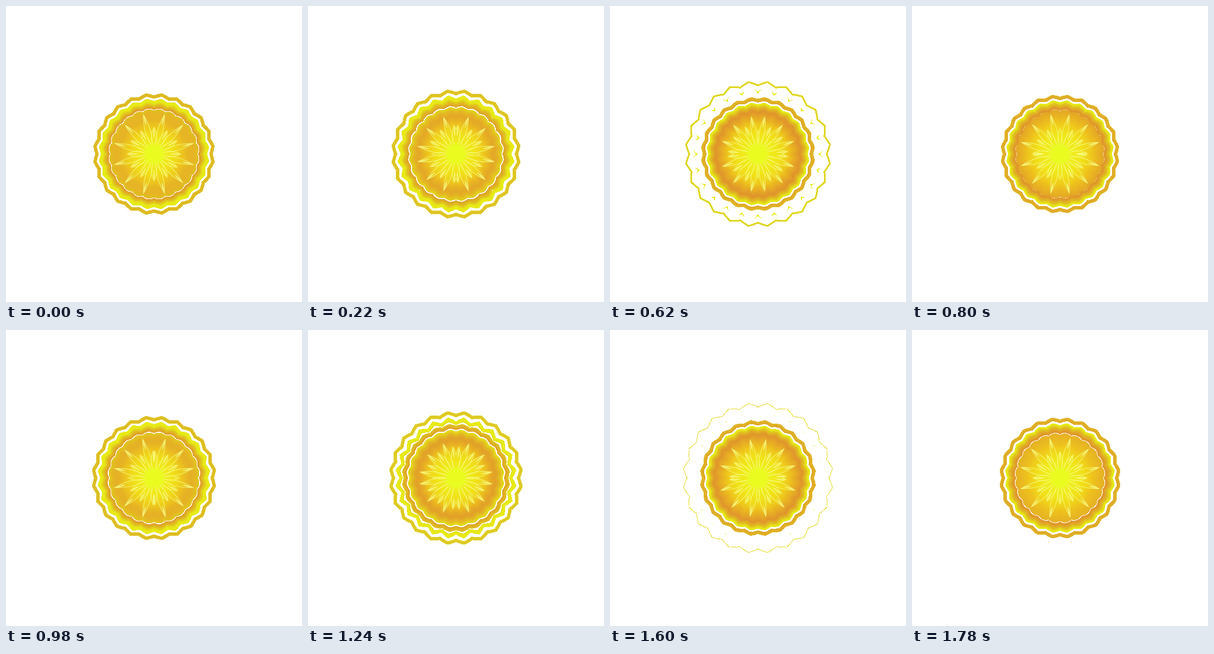
These frames come from a looping animation (512x512 px, 1800 ms). An HTML page with a canvas:

```html
<!DOCTYPE html>
<html lang="en">
<head>
<meta charset="utf-8">
<title>Blooming sun</title>
<style>
  html, body { margin: 0; width: 100%; height: 100%; overflow: hidden; background: #fff; }
  canvas { display: block; width: 100vmin; height: 100vmin; }
</style>
</head>
<body>
<canvas width="512" height="512"></canvas>
<script>
const ctx = document.querySelector('canvas').getContext('2d');
const CYCLE = 900, STEP = 20, SIZE = 272, MID = 256, LEFT = MID - SIZE / 2;
const BIRTH = -0.13, DEATH = 1.82; // life of a ring, in cycles

const WHITE = [255, 255, 255], YELLOW = [231, 234, 22], GOLD = [224, 190, 32],
      ORANGE = [224, 150, 43], AMBER = [230, 180, 36], CORE = [234, 251, 32];

const clamp = x => Math.max(0, Math.min(1, x));
const mix = (a, b, k) => a.map((v, i) => v + (b[i] - v) * k);

// Colour ramp sampled into 101 entries; stops are [position, colour].
function ramp(stops) {
  return Array.from({ length: 101 }, (_, n) => {
    const x = n / 100;
    let i = 1;
    while (i < stops.length - 1 && x > stops[i][0]) i++;
    const [x0, a] = stops[i - 1], [x1, b] = stops[i];
    return mix(a, b, clamp((x - x0) / (x1 - x0)));
  });
}
const pick = (colors, x) => colors[Math.round(clamp(x) * 100)];

// The four edges of a ring and the zigzag inside it, speeding up outward with age.
function wave(age) {
  const life = clamp((DEATH - age) / 0.25), late = Math.max(0, age - 1);
  const depth = 3 + 1.3 * age * age, zigDepth = depth + 6 * late;
  const ringOut = 89 + 8.9 * age + 8.1 * age * age;
  const ringIn = ringOut - (6.3 + 3.7 * Math.max(0, 1 - age) ** 2) * life;
  const zigOut = ringIn - (1.2 + 2.5 * age) * clamp((age - BIRTH) / 0.1);
  const zigIn = zigOut - 11 + 50 * late ** 3;
  const zigInValley = zigOut - zigDepth - 6.5 * life;
  const round = clamp(1 - age / 0.8);
  const edge = (peak, valley) => u => valley + (peak - valley) * (u + round * u * (1 - u));
  return {
    ringOut: edge(ringOut, ringOut - depth),
    ringIn: edge(ringIn, ringIn - depth),
    zigOut: edge(zigOut, zigOut - zigDepth),
    zigIn: edge(zigIn, zigInValley)
  };
}

// Polar grid: radius, and place between valley (0) and peak (1).
const radius = new Float32Array(SIZE * SIZE), fold = new Float32Array(SIZE * SIZE);
for (let i = 0; i < radius.length; i++) {
  const x = i % SIZE + 0.5 - SIZE / 2, y = Math.floor(i / SIZE) + 0.5 - SIZE / 2;
  radius[i] = Math.hypot(x, y);
  const tooth = (Math.atan2(x, -y) + 2 * Math.PI) * 12 / Math.PI;
  fold[i] = 1 - Math.abs(2 * (tooth % 1) - 1);
}
const image = ctx.createImageData(SIZE, SIZE);

function drawBands(x) {
  const old = wave(x + 1), mid = wave(x);
  const seed = 62 + 17.5 * x, seedEdge = u => seed - 4 + 4 * u;
  const young = x - 1 > BIRTH ? wave(x - 1) : { ringIn: seedEdge, zigOut: seedEdge };

  const ripe = clamp(x * 1.6);
  const heat = Math.sin(Math.PI * x ** 1.5);
  const rimColor = mix(GOLD, YELLOW, ripe);
  const disc = ramp([
    [0, CORE], [0.2, CORE], [0.5, [241, 217, 26]], [0.74, [238, 194, 28]],
    [1, mix(AMBER, ORANGE, heat)]
  ]);
  const rim = ramp([
    [0, rimColor], [0.12, rimColor], [0.42, mix(AMBER, GOLD, ripe)],
    [0.85, mix(AMBER, ORANGE, ripe)], [1, mix(AMBER, ORANGE, ripe)]
  ]);
  const band = ramp([
    [0, YELLOW], [0.3, YELLOW], [0.62, GOLD],
    [1, mix(ORANGE, [224, 168, 42], Math.min(ripe, 0.9))]
  ]);
  const hoop = ramp([
    [0, mix([218, 196, 44], [226, 224, 44], ripe)],
    [0.5, mix([224, 182, 34], [221, 205, 40], ripe)],
    [1, mix([222, 190, 30], [230, 230, 28], ripe)]
  ]);

  function colorAt(r, u) {
    const discEdge = young.zigOut(u);
    if (r < discEdge) return pick(disc, r / discEdge);
    const rimIn = young.ringIn(u), rimOut = mid.zigOut(u);
    if (r < rimIn) return WHITE;
    if (r < rimOut) return pick(rim, (rimOut - r) / (rimOut - rimIn));
    const bandIn = mid.ringIn(u), bandOut = old.zigOut(u);
    if (r < bandIn) return WHITE;
    const gapIn = mid.ringOut(u), gapOut = old.zigIn(u);
    if (r < gapIn || (r < bandOut && r > gapOut)) {
      return pick(band, (bandOut - r) / (bandOut - bandIn));
    }
    const hoopOut = old.ringOut(u), hoopIn = old.ringIn(u);
    return r < hoopOut && r > hoopIn ? pick(hoop, (hoopOut - r) / (hoopOut - hoopIn)) : WHITE;
  }

  radius.forEach((r, i) => {
    const [red, green, blue] = r > 134 ? WHITE : colorAt(r, fold[i]);
    image.data.set([red, green, blue, 255], i * 4);
  });
  ctx.putImageData(image, LEFT, LEFT);
}

function leaf(from, to, half) {
  const middle = -(from + to) / 2;
  ctx.beginPath();
  ctx.moveTo(0, -from);
  ctx.quadraticCurveTo(half * 2, middle, 0, -to);
  ctx.quadraticCurveTo(-half * 2, middle, 0, -from);
}

function drawNeedle(deg) {
  const length = 58 - 12 * Math.cos(deg * Math.PI / 15);
  ctx.save();
  ctx.rotate(deg * Math.PI / 180);
  leaf(10, length, 4.6);
  ctx.fillStyle = 'rgba(240,234,24,.2)';
  ctx.fill();
  ctx.strokeStyle = 'rgba(246,252,128,.8)';
  ctx.lineWidth = 1.1;
  ctx.stroke();
  leaf(length - 20, length + 1, 1.3);
  ctx.fillStyle = 'rgba(248,252,140,.8)';
  ctx.fill();
  ctx.restore();
}

function glow(color, inner, outer, alpha) {
  const fill = ctx.createRadialGradient(0, 0, inner, 0, 0, outer);
  fill.addColorStop(0, `rgba(${color},${alpha})`);
  fill.addColorStop(1, `rgba(${color},0)`);
  ctx.fillStyle = fill;
  ctx.fillRect(-outer, -outer, outer * 2, outer * 2);
}

function drawCore(x) {
  ctx.save();
  ctx.translate(MID, MID);
  glow([242, 234, 24], 14, 58, 0.7);

  // Needles turn inside one quadrant, mirrored to the other three.
  for (let q = 0; q < 4; q++) {
    ctx.save();
    ctx.scale(q & 1 ? -1 : 1, q & 2 ? -1 : 1);
    ctx.beginPath();
    ctx.rect(0, -90, 90, 90);
    ctx.clip();
    for (let k = -1; k < 7; k++) drawNeedle(15 * (x + k));
    ctx.restore();
  }

  glow(CORE, 14, 21, 1);
  ctx.restore();
}

let shown = -1;
function draw(time) {
  const phase = Math.floor(time / STEP) * STEP % CYCLE;
  if (phase === shown) return;
  shown = phase;
  drawBands(phase / CYCLE);
  drawCore(phase / CYCLE);
}

const start = performance.now();
function tick() {
  draw(performance.now() - start);
  requestAnimationFrame(tick);
}
tick();
</script>
</body>
</html>
```
